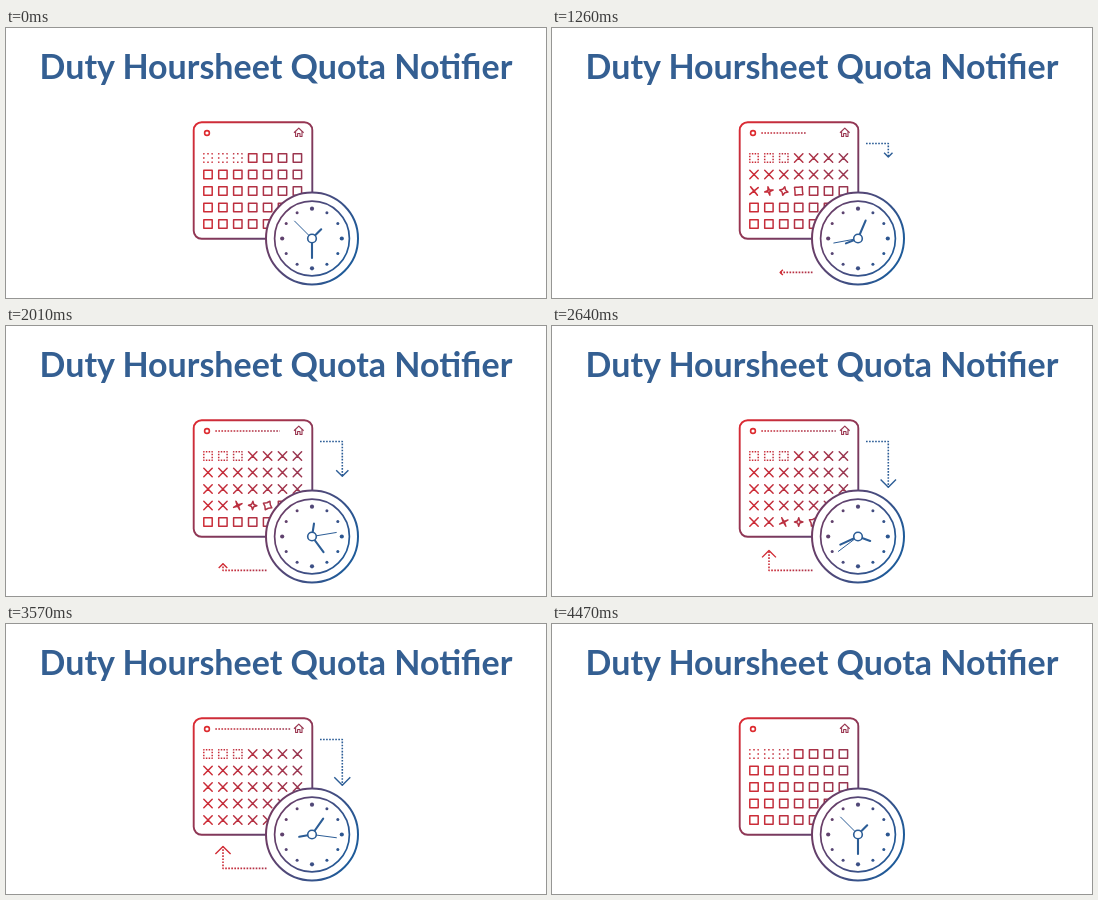
These frames come from a looping animation (540x270 px, 4500 ms). An HTML page with a canvas:

```html
<!DOCTYPE html>
<html lang="en">
<head>
<meta charset="utf-8">
<title>Duty Hoursheet Quota Notifier</title>
<style>
  html, body { margin: 0; width: 100%; height: 100%; overflow: hidden; background: #fff; }
  canvas { position: absolute; left: 0; top: 0; }
  h1 {
    position: absolute; left: 0; top: 17px; width: 540px; margin: 0;
    font: 700 34px/41px Lato, sans-serif; color: #345f92;
    text-align: center; white-space: nowrap;
  }
</style>
</head>
<body>
<canvas id="stage" width="540" height="270"></canvas>
<h1>Duty Hoursheet Quota Notifier</h1>
<script>
const ctx = document.getElementById('stage').getContext('2d');
const LOOP = 4500, STEP = 30, TURN = 4470;
const GROW_END = 2760, LEAVE = 3600, RESET = 3810;
const CLOCK = { x: 306, y: 210.5 };
const BLUE = '#2c5d96';

const clamp = v => Math.max(0, Math.min(1, v));
const mix = (a, b, k) => a + (b - a) * k;
const span = (t, from, to) => clamp((t - from) / (to - from));

function gradient(x0, y0, x1, y1, ...colors) {
  const g = ctx.createLinearGradient(x0, y0, x1, y1);
  colors.forEach((c, i) => g.addColorStop(i / (colors.length - 1), c));
  return g;
}
const frameInk = gradient(188, 94, 340, 250, '#dd2a32', '#783a5f', '#1f5b99');
const dayInk = gradient(197, 0, 298, 0, '#cf2b35', '#963752');
const returnInk = gradient(209, 0, 260, 0, '#d12c35', '#ad3249');
const dialInk = gradient(262, 190, 345, 225, '#743a60', '#1f5b99');

function stroke(points, ink, width, closed) {
  ctx.beginPath();
  points.forEach(([x, y]) => ctx.lineTo(x, y));
  if (closed) ctx.closePath();
  ctx.strokeStyle = ink;
  ctx.lineWidth = width;
  ctx.stroke();
}

function disc(x, y, r, fill, ink, width) {
  ctx.beginPath();
  ctx.arc(x, y, r, 0, Math.PI * 2);
  if (fill) { ctx.fillStyle = fill; ctx.fill(); }
  if (ink) { ctx.strokeStyle = ink; ctx.lineWidth = width; ctx.stroke(); }
}

function dashed(points, ink, width, dash, offset, closed) {
  ctx.setLineDash(dash);
  ctx.lineDashOffset = offset;
  stroke(points, ink, width, closed);
  ctx.setLineDash([]);
}

// Point and heading at a distance along a polyline.
function along(path, dist) {
  for (let i = 1; ; i++) {
    const [ax, ay] = path[i - 1], [bx, by] = path[i];
    const len = Math.hypot(bx - ax, by - ay);
    if (dist <= len || i === path.length - 1) {
      const k = Math.min(1, dist / len);
      return { x: mix(ax, bx, k), y: mix(ay, by, k), i, angle: Math.atan2(by - ay, bx - ax) };
    }
    dist -= len;
  }
}

const lengthOf = path => path.slice(1).reduce(
  (sum, [x, y], i) => sum + Math.hypot(x - path[i][0], y - path[i][1]), 0);

function dottedTrail(path, from, to, ink) {
  if (to - from < 0.3) return;
  const a = along(path, from), b = along(path, to);
  dashed([[a.x, a.y], ...path.slice(a.i, b.i), [b.x, b.y]], ink, 1.6, [1.65, 1.4], from);
}

// Grows from its start, later disappears towards its tip.
function trail(path, t, { ink, until, power = 1, headSize }) {
  const leave = span(t, LEAVE, TURN);
  if (t === 0 || leave === 1) return;
  const total = lengthOf(path);
  const end = total * (1 - Math.pow(1 - span(t, 0, until), power));
  dottedTrail(path, total * Math.pow(leave, 1.45), end, ink);
  if (!headSize) return;
  const size = headSize(span(t, 0, GROW_END)) * (1 - 0.87 * leave);
  const tip = along(path, end);
  ctx.save();
  ctx.translate(tip.x, tip.y);
  ctx.rotate(tip.angle);
  stroke([[-size, -size], [0, 0], [-size, size]], ink, 1.4);
  ctx.restore();
}

// A square whose edge midpoints sink to the centre while it turns into a cross.
// Its corners stay on the outline of the square during the turn.
function day(x, y, k) {
  const turn = k * Math.PI / 2;
  const half = 4.2 / (Math.cos(turn) + Math.sin(turn)), mid = half * (1 - k);
  ctx.save();
  ctx.translate(x, y);
  ctx.rotate(-turn);
  ctx.translate(-x, -y);
  stroke([
    [x - half, y - half], [x, y - mid], [x + half, y - half], [x + mid, y],
    [x + half, y + half], [x, y + mid], [x - half, y + half], [x - mid, y]
  ], dayInk, 1.5, true);
  ctx.restore();
}

function dottedDay(x, y, k) {
  const r = 4.2, dot = 1.5, pitch = 8 * r / mix(8, 12, k);
  dashed([[x - r, y - r], [x + r, y - r], [x + r, y + r], [x - r, y + r]],
    dayInk, 1.5, [dot, pitch - dot], dot / 2, true);
}

function calendar(t) {
  ctx.beginPath();
  ctx.roundRect(187.7, 94.2, 118.6, 116.6, 8);
  ctx.strokeStyle = frameInk;
  ctx.lineWidth = 1.9;
  ctx.stroke();

  disc(201, 105, 2.4, null, '#dd2b2f', 1.6);
  stroke([[288, 104.7], [292.8, 100.1], [297.6, 104.7]], dayInk, 1.2);
  stroke([[289.6, 103.6], [289.6, 108.5], [291.6, 108.5], [291.6, 105.5],
    [294, 105.5], [294, 108.5], [296, 108.5], [296, 103.6]], dayInk, 1.1);
  trail([[209.3, 105], [284.5, 105]], t, { ink: dayInk, until: GROW_END, power: 1.5 });

  const back = 1 - span(t, RESET, 4440);
  for (let i = 0; i < 35; i++) {
    const x = 202 + (i % 7) * 14.9, y = 130 + Math.floor(i / 7) * 16.5;
    if (i < 3) {
      dottedDay(x, y, Math.min(span(t, 0, 450), back));
    } else {
      const start = (i - 3) * 89;
      day(x, y, Math.min(span(t, start, start + 300), back));
    }
  }
}

function hand(degrees, length, width) {
  const a = degrees * Math.PI / 180;
  stroke([[CLOCK.x, CLOCK.y],
    [CLOCK.x + Math.sin(a) * length, CLOCK.y - Math.cos(a) * length]], BLUE, width);
}

function clock(t) {
  const { x, y } = CLOCK;
  disc(x, y, 46, '#fff', dialInk, 2);
  disc(x, y, 37.4, null, dialInk, 1.7);
  for (let i = 0; i < 12; i++) {
    const a = i * Math.PI / 6;
    disc(x + Math.sin(a) * 29.8, y - Math.cos(a) * 29.8, i % 3 ? 1.5 : 2.1, dialInk);
  }
  const turn = 360 * t / TURN;
  ctx.lineCap = 'round';
  hand(45 + 2 * turn, 13, 2.1);
  hand(180 + 2 * turn, 19.5, 2.1);
  ctx.lineCap = 'butt';
  hand(315 + 3 * turn, 25, 1);
  disc(x, y, 4.3, '#fff', BLUE, 1.6);
}

function draw(now) {
  const t = Math.floor((now % LOOP) / STEP) * STEP;
  ctx.clearRect(0, 0, 540, 270);
  ctx.lineJoin = 'round';
  calendar(t);
  trail([[314, 115.5], [336.3, 115.5], [336.3, 161.3]], t,
    { ink: BLUE, until: 2400, headSize: k => 1 + 7 * k });
  trail([[260.5, 244.4], [217, 244.4], [217, 222.5]], t,
    { ink: returnInk, until: GROW_END, power: 1.12, headSize: k => 2.2 + 5.4 * k ** 3 });
  clock(t);
}

let origin;
function tick(now) {
  origin ??= now;
  draw(now - origin);
  requestAnimationFrame(tick);
}
draw(0);
requestAnimationFrame(tick);
</script>
</body>
</html>
```
